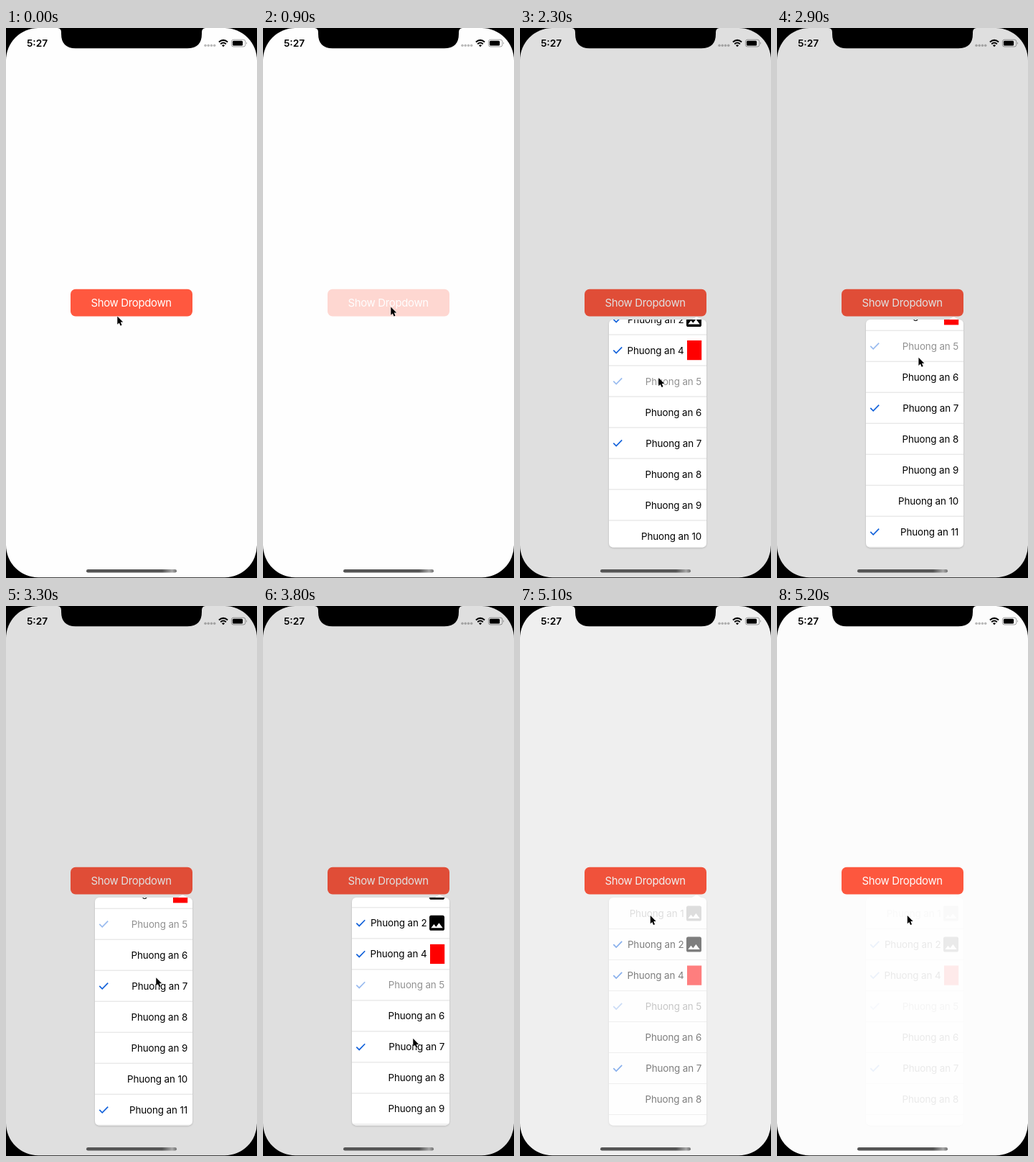
These frames come from a looping animation (350 by 764 pixels, 5.3 s). An HTML page:

```html
<!DOCTYPE html>
<html lang="en">
<head>
<meta charset="utf-8">
<title>Dropdown</title>
<style>
  html, body { margin: 0; width: 100%; height: 100%; overflow: hidden; background: #000; }
  svg { display: block; width: 350px; height: 764px; font-family: Inter, Roboto, sans-serif; }
  .row-text { font-size: 13.4px; letter-spacing: -.1px; text-anchor: end; }
</style>
</head>
<body>
<svg viewBox="0 0 350 764">
  <defs>
    <clipPath id="panelClip"><rect x="124" y="405" width="136" height="316.5" rx="6"/></clipPath>
    <linearGradient id="homeFill">
      <stop offset=".84" stop-color="#555"/>
      <stop offset=".95" stop-color="#a8a8a8"/>
      <stop offset="1" stop-color="#707070"/>
    </linearGradient>
    <filter id="shadow" x="-10%" y="-10%" width="120%" height="120%">
      <feDropShadow dx="0" dy="1" stdDeviation="1.3" flood-opacity=".2"/>
    </filter>
    <path id="image" d="M21 19V5c0-1.1-.9-2-2-2H5c-1.1 0-2 .9-2 2v14c0 1.1.9 2 2 2h14c1.1 0 2-.9 2-2zM8.5 13.5l2.5 3.01L14.5 12l4.5 6H5l3.5-4.5z"/>
  </defs>

  <rect width="350" height="763.3" rx="45" fill="#fefefe"/>

  <g id="button">
    <rect x="90" y="362.8" width="170" height="37.7" rx="7" fill="#ff583f"/>
    <text x="174.6" y="387.3" font-size="14.9" letter-spacing="-.3" text-anchor="middle" fill="#fff">Show Dropdown</text>
  </g>

  <g id="dropdown">
    <rect width="350" height="763.3" rx="45" fill-opacity=".12"/>
    <g filter="url(#shadow)" fill="#fff">
      <path d="M239 405.5L245 401.8Q246.3 401 247.6 401.8L253.5 405.5Z"/>
      <rect x="124" y="405" width="136" height="316.5" rx="6"/>
    </g>
    <g clip-path="url(#panelClip)"><g id="list"></g></g>
  </g>

  <path d="M72 0Q77 .5 77 6V8Q77 28.2 97 28.2H253Q273 28.2 273 8V6Q273 .5 278 0Z"/>
  <text x="28.9" y="26.1" font-size="13.7" font-weight="600">5:27</text>
  <g id="signal" fill-opacity=".27"></g>
  <g fill="none" stroke="#000" stroke-width="2">
    <path d="M296.9 19.6Q303 14.2 309.1 19.6"/>
    <path d="M299.2 22.2Q303 18.9 306.8 22.2"/>
  </g>
  <path d="M300.9 24.1Q303 22.3 305.1 24.1L303 26.3Z"/>
  <rect x="314.4" y="16.2" width="19.4" height="9.8" rx="2.8" fill="none" stroke="#000" stroke-opacity=".4" stroke-width=".9"/>
  <rect x="315.9" y="17.7" width="14.2" height="6.8" rx="1.5"/>
  <path d="M335.2 19.5Q337 21 335.2 22.7Z" fill-opacity=".45"/>
  <rect x="112" y="752" width="126" height="4.6" rx="2.3" fill="url(#homeFill)"/>

  <path id="cursor" d="M0 0V11.2L2.5 8.9L4.3 13L6.2 12.2L4.5 8.1H7.9Z" stroke="#fff" stroke-width="1" paint-order="stroke" stroke-linejoin="round"/>
</svg>

<script>
const LOOP = 5300, STEP = 100;
const ROW = 43, TOP = 405.5, MAX_SCROLL = 114.3;
const el = id => document.getElementById(id);

const icons = {
  image: '<use href="#image" transform="translate(228.5 7.5) scale(1.167)"/>',
  red: '<rect x="233" y="8" width="20.2" height="27.2" fill="#f00"/>'
};
const iconOf = { 1: "image", 2: "image", 4: "red" };
const checked = [2, 4, 5, 7, 11], disabled = 5, missing = 3;
const numbers = Array.from({ length: 11 }, (_, i) => i + 1).filter(n => n !== missing);

function rowMarkup(n, i) {
  const icon = iconOf[n];
  const check = checked.includes(n)
    ? '<path d="M130.3 21.7L134.2 25.6L142.2 17.4" fill="none" stroke="#1463db" stroke-width="1.7"/>' : "";
  return `<g transform="translate(0 ${TOP + i * ROW})">
    <g class="row" opacity="${n === disabled ? .43 : 1}">${check}
      <text class="row-text" x="${icon ? 228.5 : 253.2}" y="26.5">Phuong an ${n}</text>
      ${icons[icon] || ""}
    </g>
    <path d="M124 ${ROW}H260" stroke="#dcdcdc" stroke-width=".9"/>
  </g>`;
}
el("list").innerHTML = numbers.map(rowMarkup).join("");
const firstRow = document.querySelector(".row");

for (let i = 0; i < 4; i++) {
  el("signal").innerHTML += `<circle cx="${278 + i * 4.23}" cy="24.2" r="1.75"/>`;
}

// Eased progress from 0 to 1 between two times.
function ramp(t, from, to) {
  const u = Math.min(1, Math.max(0, (t - from) / (to - from)));
  return u * u * (3 - 2 * u);
}

const scrollAt = t => MAX_SCROLL * (ramp(t, 1850, 2670) - ramp(t, 3400, 4000));

// Pointer moves between drags; dragging itself follows the list.
const moves = [
  { from: 0, to: 500, dx: 23, dy: -13 },
  { from: 1000, to: 1400, dx: 15, dy: 97 },
  { from: 1400, to: 1800, dx: 0, dy: 67 },
  { from: 2700, to: 3300, dx: 16, dy: 79 },
  { from: 4000, to: 4400, dx: -3, dy: -179 },
  { from: 4400, to: 4800, dx: -24.5, dy: -21.5 }
];

function cursorAt(t) {
  let x = 155.3, y = 400.5 - scrollAt(t);
  for (const m of moves) {
    const p = ramp(t, m.from, m.to);
    x += m.dx * p;
    y += m.dy * p;
  }
  return `${x} ${y}`;
}

function draw(now) {
  const t = Math.floor(now % LOOP / STEP) * STEP;
  el("cursor").setAttribute("transform", `translate(${cursorAt(t)})`);
  el("list").setAttribute("transform", `translate(0 ${-scrollAt(t)})`);
  el("button").setAttribute("opacity", 1 - .77 * (ramp(t, 750, 900) - ramp(t, 1000, 1250)));
  el("dropdown").setAttribute("opacity", ramp(t, 1000, 1300) - ramp(t, 4950, 5250));
  firstRow.setAttribute("opacity", 1 - .75 * ramp(t, 4750, 4900));
}

const start = performance.now();
function tick() {
  draw(performance.now() - start);
  requestAnimationFrame(tick);
}
tick();
</script>
</body>
</html>
```
